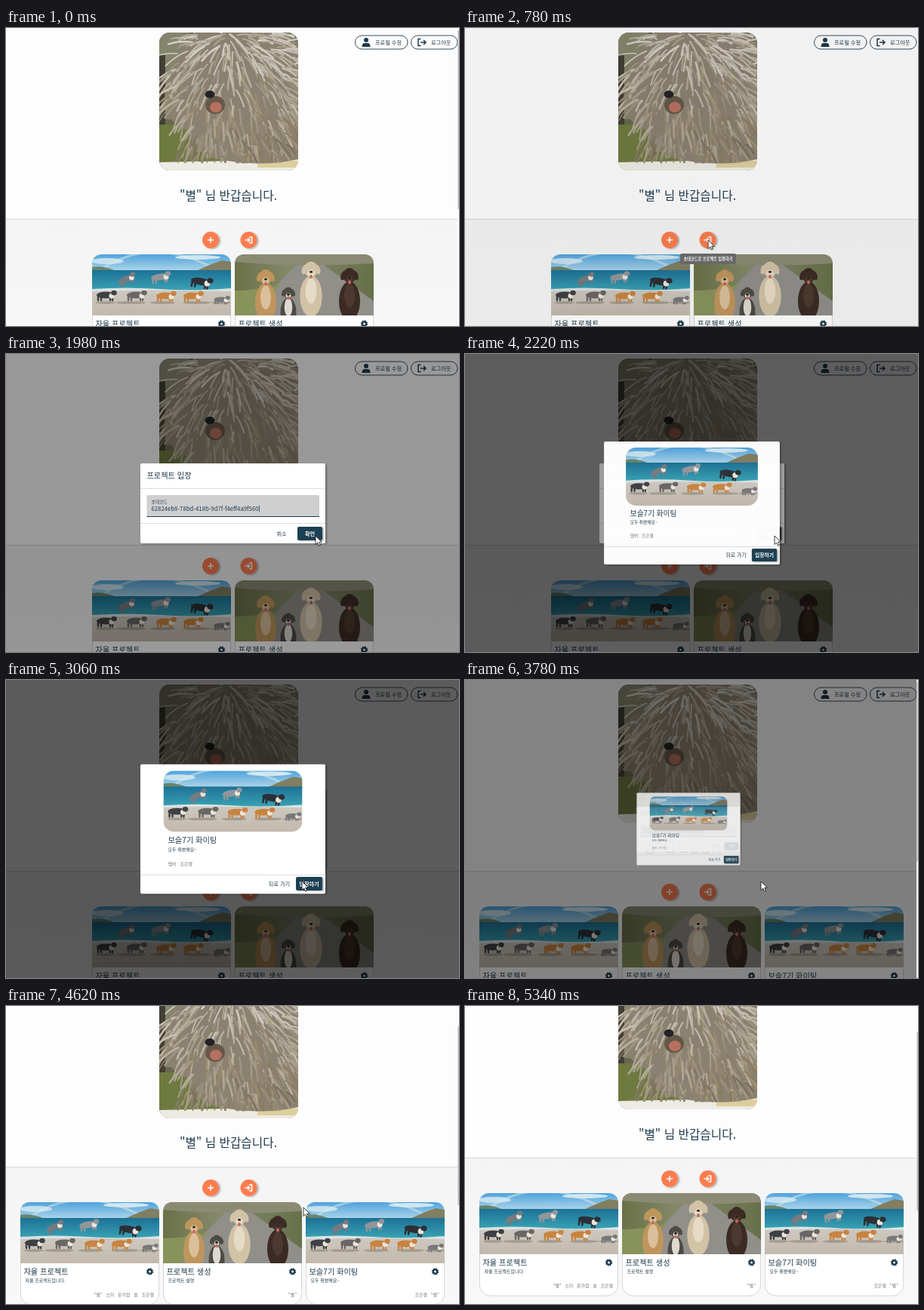
An HTML page for the animation above (5580 ms loop, 600 by 395 pixels).

```html
<!DOCTYPE html>
<html lang="ko">
<meta charset="utf-8">
<style>
html, body { margin: 0; width: 100%; height: 100%; overflow: hidden; background: #fefdfe; }
svg { display: block; width: 600px; height: 395px; font-family: "Noto Sans CJK KR", "Noto Sans CJK", sans-serif; fill: #1d3a4c; }
.line { fill: none; stroke: #1d3a4c; }
.title { font-size: 10.2px; }
.small { font-size: 6px; }
.btn { font-size: 7.2px; }
.mid { text-anchor: middle; }
.on { fill: #fff; font-weight: 700; }
.grey { fill: #777; }
.veil { fill: #000; }
</style>
<svg viewBox="0 0 600 395">
  <defs>
    <linearGradient id="floor" x2="0" y2="1"><stop stop-color="#f4f4f4"/><stop offset="1" stop-color="#f9f9f9"/></linearGradient>
    <linearGradient id="sky" x2="0" y2="1"><stop stop-color="#4fa3dc"/><stop offset="1" stop-color="#b5d9ea"/></linearGradient>
    <linearGradient id="sea" x2="0" y2="1"><stop stop-color="#1c7197"/><stop offset="1" stop-color="#3aa3b4"/></linearGradient>
    <linearGradient id="sand" x2="0" y2="1"><stop stop-color="#cec8c0"/><stop offset="1" stop-color="#c2b9ac"/></linearGradient>
    <linearGradient id="leaf"><stop stop-color="#6a7148"/><stop offset=".4" stop-color="#84896a"/><stop offset="1" stop-color="#66704a"/></linearGradient>
    <filter id="shade" x="-20%" y="-20%" width="140%" height="150%"><feDropShadow dy="1" stdDeviation="1.3" flood-opacity=".3"/></filter>
    <clipPath id="portraitClip"><rect width="184" height="183" rx="14"/></clipPath>
    <clipPath id="topClip"><path d="M0 81V14Q0 0 14 0H170Q184 0 184 14V81Z"/></clipPath>
    <clipPath id="roundClip"><rect width="184" height="81" rx="14"/></clipPath>
    <g id="gear">
      <circle r="2.6" class="line" stroke-width="2.2"/>
      <circle r="4" class="line" stroke-width="1.4" stroke-dasharray="1.7 1.44"/>
    </g>
    <g id="beach"></g>
    <g id="road"></g>
  </defs>

  <g id="page">
    <rect width="600" height="254" fill="#fefdfe"/>
    <rect y="254" width="600" height="230" fill="url(#floor)"/>
    <path d="M0 253.5H600" stroke="#d5d5d5"/>
    <g id="portrait" transform="translate(203 6)" clip-path="url(#portraitClip)"></g>
    <text x="294.5" y="227.5" class="mid" font-size="15.7" font-weight="500">"별" 님 반갑습니다.</text>

    <g fill="none" stroke="#1d3a4c" stroke-width=".9">
      <rect x="462.5" y="10" width="69.5" height="18" rx="9"/>
      <rect x="536.5" y="10" width="61.5" height="18" rx="9"/>
    </g>
    <circle cx="477" cy="16" r="3"/>
    <path d="M471.5 25Q471.5 20 475 20H479Q482.5 20 482.5 25Z"/>
    <path d="M549.5 14.5H546V23.5H549.5M549 19H555.5M553 16L556 19L553 22" class="line" stroke-width="1.5"/>
    <text x="489" y="21.7" class="btn">프로필 수정</text>
    <text x="563" y="21.7" class="btn">로그아웃</text>

    <g fill="#fc7d50" filter="url(#shade)"><circle cx="271" cy="281" r="11"/><circle cx="321.5" cy="281" r="11"/></g>
    <path d="M267 281H275M271 277V285" stroke="#fff" stroke-width="1.6"/>
    <path d="M322 277H325.5V285H322M316.5 281H321" fill="none" stroke="#fff" stroke-width="1.6"/>
    <path d="M320 277.5L324 281L320 284.5Z" fill="#fff"/>
    <g id="cards"></g>
  </g>

  <rect id="veil1" class="veil" width="600" height="395"/>
  <g id="dialog1"><g transform="translate(-300.5 -198)">
    <rect x="178" y="145" width="245" height="106" rx="2" fill="#fff" filter="url(#shade)"/>
    <path d="M178 178.5H423M178 224.5H423" stroke="#ddd"/>
    <text x="186.5" y="164.5" class="title">프로젝트 입장</text>
    <path d="M186.5 216V189Q186.5 187 188.5 187H413Q415 187 415 189V216Z" fill="#d0cfd0"/>
    <path d="M186.5 215.5H415" stroke="#1d3a4c" stroke-width="1.2"/>
    <text id="label" x="192.5">초대코드</text>
    <g id="code"><text x="192.5" y="207.5" font-size="7.75">62824eb8-78bd-418b-9d7f-f4eff4a9f560</text><path d="M335.5 201V209.5" class="line" stroke-width=".8"/></g>
    <text x="365" y="240.6" class="mid btn">취소</text>
    <rect x="386" y="229" width="33" height="18" rx="2" fill="#1d4052" filter="url(#shade)"/>
    <text x="402.5" y="240.6" class="mid btn on">확인</text>
  </g></g>

  <rect id="veil2" class="veil" width="600" height="395"/>
  <g id="dialog2">
    <rect x="-122.5" y="-85.7" width="245" height="171.4" rx="2" fill="#fff" filter="url(#shade)"/>
    <g transform="translate(-92 -77.3)" clip-path="url(#roundClip)"><use href="#beach"/></g>
    <text x="-86" y="18.5" class="title">보슬7기 화이팅</text>
    <text x="-86" y="29" class="small">모두 취뽀해요~</text>
    <text x="-86" y="48" class="small grey">멤버 : 조은결</text>
    <path d="M-122 61H122" stroke="#ddd"/>
    <text x="61.5" y="75.2" class="mid btn">뒤로 가기</text>
    <rect x="83.5" y="63.6" width="35" height="18" rx="2" fill="#1d4052" filter="url(#shade)"/>
    <text x="101" y="75.2" class="mid btn on">입장하기</text>
  </g>

  <g id="bar">
    <rect x="598" width="2" height="395" fill="#fcfcfc"/>
    <rect id="thumb" x="598.3" width="1.7" height="237" fill="#c3c3c3"/>
  </g>
  <g id="tip">
    <rect x="285" y="299" width="74" height="14" rx="2" fill="#686868"/>
    <text x="322" y="307.8" class="mid on" font-size="5.2">초대코드로 프로젝트 입장하기</text>
  </g>
  <path id="arrow" d="M0 0V11.5L2.7 9L4.5 13L6.4 12.2L4.7 8.3H8.2Z" fill="#fff" stroke="#111" stroke-width=".8"/>
  <path id="beam" d="M-2 -4.5H2M0 -4.5V4.5M-2 4.5H2" class="line" stroke-width=".9"/>
</svg>
<script>
const LOOP = 5580, STEP = 60;
const el = id => document.getElementById(id);
const set = (id, attrs) => { for (const k in attrs) el(id).setAttribute(k, attrs[k]); };
const show = (id, on) => set(id, { visibility: on ? 'visible' : 'hidden' });
const ellipse = (x, y, rx, ry, fill, turn = 0) =>
  `<ellipse cx="${x}" cy="${y}" rx="${rx}" ry="${ry}" fill="${fill}" transform="rotate(${turn} ${x} ${y})"/>`;
const path = (d, fill) => `<path d="${d}" fill="${fill}"/>`;

let seed = 7;
const rnd = (a, b) => {
  seed = (seed * 16807) % 2147483647;
  return a + (b - a) * seed / 2147483647;
};

// Short cords fanning out from the crown, darker towards the bottom
function portrait() {
  let s = path('M0 0H184V183H0Z', '#68694f') + path('M0 0H40V115H0Z', '#85856d') + path('M0 30H8V125H0Z', '#423f34')
    + path('M0 122H184V172H0Z', '#6f7a40') + path('M0 172L184 168V183H0Z', '#eeebe4') + path('M130 170H184V179H130Z', '#ddcf9d')
    + path('M50 0Q10 35 7 85Q8 120 38 130Q45 165 90 170Q140 178 184 168V15L165 0Z', '#8b8171');
  for (let i = 0; i < 420; i++) {
    const y = 165 * i / 420, half = 92 * Math.sqrt(1 - ((y - 80) / 100) ** 2);
    const x = 102 + rnd(-half, half), dx = x - 92, dy = y - 25;
    const a = Math.atan2(dy + 25, dx) + rnd(-.35, .35), len = rnd(14, 36);
    const x2 = x + Math.cos(a) * len, y2 = Math.min(172, y + Math.sin(a) * len);
    const tone = `hsl(40 ${rnd(10, 18)}% ${rnd(60, 84) - y * .13}%)`;
    s += `<path d="M${x} ${y}Q${(x + x2) / 2} ${(y + y2) / 2 - 4} ${x2} ${y2}" fill="none" stroke-linecap="round" stroke="${tone}" stroke-width="${rnd(1.2, 3)}"/>`;
  }
  return s + ellipse(74, 96, 13, 12, '#655848') + ellipse(67, 82, 6.5, 5, '#222326') + ellipse(75, 99, 8, 7, '#b8705f');
}

function pup(x, y, coat, size, turn) {
  const legs = [-10, -6, 6, 9].map(d => ellipse(x + d * size, y + 4.5 * size, 1.3 * size, 4 * size, coat)).join('');
  return `<g transform="rotate(${turn} ${x} ${y})">${legs}${ellipse(x, y, 12 * size, 4.4 * size, coat)}
    ${ellipse(x + 8 * size, y + size, 3.5 * size, 3.5 * size, '#ece5dc')}${ellipse(x + 11 * size, y - 3 * size, 3.8 * size, 3.2 * size, coat)}</g>`;
}

function beach() {
  let s = path('M0 0H184V24H0Z', 'url(#sky)') + ellipse(140, 4, 30, 3, '#cfe6f1') + ellipse(20, 9, 22, 4, '#c5e1ef')
    + '<path d="M12 20Q80 -26 164 20" fill="none" stroke="#dcebec" stroke-width="3" opacity=".5"/>'
    + path('M0 22V17Q14 14 32 22Z', '#68856a') + path('M138 22L156 14L172 8L184 10V22Z', '#817e62')
    + path('M0 21H184V48H0Z', 'url(#sea)') + path('M0 46Q45 43 90 46T184 45V51H0Z', '#d9e4e3')
    + path('M0 49Q90 46 184 49V81H0Z', 'url(#sand)');
  const dogs = [[45, 33, '#777b80', .95, -22], [90, 30, '#92969a', 1, -8], [144, 36, '#2c3036', 1.1, 10],
    [18, 54, '#3d4044', 1, 0], [58, 54, '#696665', 1, 0], [97, 55, '#c88442', 1, 0], [133, 55, '#c8833e', 1, 0], [171, 60, '#77787a', .8, 0]];
  for (const d of dogs) s += ellipse(d[0], 64, 13, 1.8, '#a39b8f') + pup(...d);
  return s;
}

function sitter(x, head, size, coat, chest) {
  const body = head + 32 * size;
  return ellipse(x, body + 2, 14 * size, 26 * size, coat) + ellipse(x, body - 5, 7 * size, 16 * size, chest)
    + ellipse(x - 8 * size, head, 3.5 * size, 6.5 * size, coat, 20) + ellipse(x + 8 * size, head, 3.5 * size, 6.5 * size, coat, -20)
    + ellipse(x, head, 8.5 * size, 10 * size, coat) + ellipse(x, head + 5 * size, 4.5 * size, 4.5 * size, chest)
    + ellipse(x, head + 3 * size, 2, 1.5, '#252321') + ellipse(x, head + 9 * size, 2, 2.5, '#c66a61');
}

function road() {
  return path('M0 0H184V81H0Z', 'url(#leaf)') + path('M0 0H184V12Q90 18 0 10Z', '#8b8a73')
    + path('M82 14H118L184 62V81H16Z', '#908f8a') + path('M0 48Q30 48 60 40L25 81H0Z', '#87935a')
    + sitter(152, 28, 1, '#3c2b25', '#4d392f') + sitter(101, 20, 1.05, '#d2c2a6', '#e6dbc6')
    + sitter(41, 30, 1, '#bf955c', '#dac09a') + sitter(71, 51, .75, '#4e4b46', '#dedad2');
}

const card = (id, art, title, note, team) => `<g id="${id}">
  <rect x=".5" y=".5" width="183" height="135.5" rx="14" fill="#fff" stroke="#d8d8d8"/>
  <g clip-path="url(#topClip)"><use href="#${art}"/></g>
  <text x="4.5" y="96" class="title">${title}</text>
  <text x="6.5" y="106.3" class="small">${note}</text>
  <text x="177" y="125.3" class="small grey" text-anchor="end" word-spacing="3">${team}</text>
  <use href="#gear" x="171.5" y="92"/></g>`;

el('portrait').innerHTML = portrait();
el('beach').innerHTML = beach();
el('road').innerHTML = road();
el('cards').innerHTML =
  card('card0', 'beach', '자율 프로젝트', '자율 프로젝트입니다.', '"별" 소미 문가람 솔 조은결')
  + card('card1', 'road', '프로젝트 생성', '프로젝트 설명', '"별"')
  + card('card2', 'beach', '보슬7기 화이팅', '모두 취뽀해요~', '조은결 "별"');

const ramp = (t, from, span) => Math.min(1, Math.max(0, (t - from) / span));
const smooth = p => p * p * (3 - 2 * p);
const ease = (t, from, span) => smooth(ramp(t, from, span));

// Pointer stops: time, x, y
const stops = [[240, 420, 400], [600, 322, 281], [960, 322, 281], [1200, 279, 203], [1560, 279, 203], [1860, 410, 241],
  [2640, 410, 241], [3000, 392, 267], [4500, 392, 267], [4620, 394, 267], [4760, 394, 267], [5000, 420, 400]];

function pointer(t) {
  const i = stops.findIndex(s => s[0] > t);
  if (i < 1) return [-50, -50];
  const [a, b] = [stops[i - 1], stops[i]], p = ease(t, a[0], b[0] - a[0]);
  return [a[1] + (b[1] - a[1]) * p, a[2] + (b[2] - a[2]) * p];
}

function modal(n, grow, x, y) {
  set('veil' + n, { opacity: .4 * grow ** .6 });
  set('dialog' + n, { opacity: grow ** .4, transform: `translate(${x} ${y}) scale(${grow})` });
}

function draw(t) {
  const joined = t >= 3690, left = joined ? 19 : 114;
  for (let i = 0; i < 3; i++) set('card' + i, { transform: `translate(${left + 189 * i} 300)` });
  show('card2', joined);

  const scroll = 52 * (1 - (1 - ramp(t, 4464, 300)) ** 2);
  set('page', { transform: `translate(0 ${-scroll})` });
  set('thumb', { y: 3 + scroll * .6 });
  show('bar', t < 760 || joined);

  const closing = 1 - ease(t, 3688, 200), cx = joined ? 296 : 300.5;
  modal(1, Math.min(ease(t, 760, 200), closing), cx, 198);
  modal(2, Math.min(ease(t, 2047, 200), closing), cx, 197.5);
  const lift = ease(t, 1230, 100);
  set('label', { y: 204.5 - 7 * lift, 'font-size': 7.5 - 1.7 * lift });
  show('code', t >= 1380);
  set('tip', { opacity: Math.min(ramp(t, 600, 90), 1 - ramp(t, 810, 90)) });

  const [x, y] = pointer(t);
  const typing = t > 950 && t < 2040 && x > 187 && x < 415 && y > 187 && y < 216;
  for (const id of ['arrow', 'beam']) set(id, { transform: `translate(${x} ${y})` });
  show('arrow', !typing);
  show('beam', typing);
}

const start = performance.now();
function tick() {
  const t = (performance.now() - start) % LOOP;
  draw(Math.floor(t / STEP) * STEP);
  requestAnimationFrame(tick);
}
tick();
</script>
</html>
```
